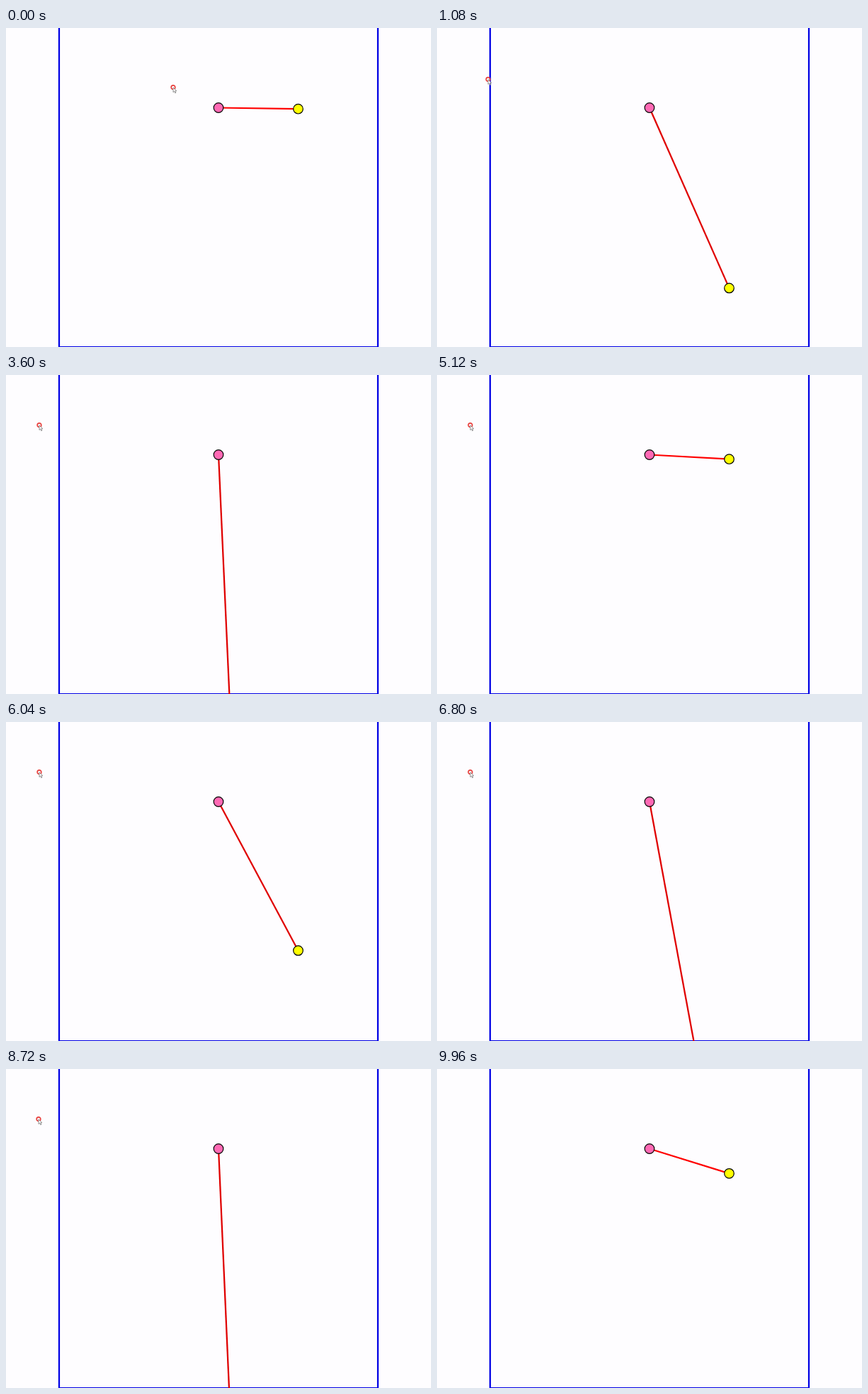
Recreate the animation shown at these times as an HTML page with a canvas. Size 600 by 450 pixels, loop 10000 ms.

```html
<!DOCTYPE html>
<html lang="en">
<head>
<meta charset="utf-8">
<title>Falling ball on a line</title>
<style>
  html, body { margin: 0; width: 100%; height: 100%; overflow: hidden; background: #fefdff; }
  canvas { display: block; }
</style>
</head>
<body>
<canvas id="stage" width="600" height="450"></canvas>
<script>
const ctx = document.getElementById('stage').getContext('2d');
const LOOP = 10000, STEP = 40;
const ANCHOR = { x: 300, y: 112.5 };
const BALL_X = 412.5, HALF_G = 180;

// Each drop: start time in seconds and release height.
const drops = [
  { start: -0.11, y: 112 },
  { start: 4.965, y: 114.4 },
  { start: 9.52, y: 112.5 }
];

// Pointer stops: time in seconds, x, y.
const stops = [
  [0, 236, 84], [1.4, 47, 71], [6.8, 47, 71], [7.2, 46, 71],
  [8.8, 46, 71], [9.36, 43, 70], [9.8, -12, 62], [10, -12, 62]
];

const smooth = u => u * u * (3 - 2 * u);

function ballY(t) {
  const drop = drops.filter(d => d.start <= t).pop();
  return drop.y + HALF_G * (t - drop.start) ** 2;
}

function pointerAt(t) {
  const i = stops.findIndex(s => s[0] > t);
  const [t0, x0, y0] = stops[i - 1], [t1, x1, y1] = stops[i];
  const k = smooth((t - t0) / (t1 - t0));
  return [x0 + (x1 - x0) * k, y0 + (y1 - y0) * k];
}

function stroke(color, width) {
  ctx.strokeStyle = color;
  ctx.lineWidth = width;
  ctx.stroke();
}

function disc(x, y, fill) {
  ctx.beginPath();
  ctx.arc(x, y, 6.8, 0, Math.PI * 2);
  ctx.fillStyle = fill;
  ctx.fill();
  stroke('#000', 1.2);
}

function pointer(x, y) {
  ctx.save();
  ctx.translate(x, y);
  ctx.beginPath();
  ctx.arc(0, -0.3, 2.8, 0, Math.PI * 2);
  stroke('#e8413f', 1.7);
  ctx.beginPath();
  for (const p of [[0, 0], [0, 6.6], [1.6, 5.2], [2.8, 7.8], [3.9, 7.2], [2.8, 4.8], [4.8, 4.7]]) ctx.lineTo(...p);
  ctx.closePath();
  ctx.fillStyle = '#fff';
  ctx.fill();
  stroke('#666', 0.7);
  ctx.restore();
}

function draw(t) {
  ctx.fillStyle = '#fefdff';
  ctx.fillRect(0, 0, 600, 450);

  ctx.beginPath();
  ctx.rect(75, -20, 450, 470);
  stroke('#0000e4', 2.25);

  const y = ballY(t);
  const shade = 255 - Math.min(31, Math.max(0, y - 150) * 0.25);
  ctx.beginPath();
  ctx.moveTo(ANCHOR.x, ANCHOR.y);
  ctx.lineTo(BALL_X, y);
  stroke(`rgb(${Math.round(shade)}, 0, 0)`, 2.25);

  disc(ANCHOR.x, ANCHOR.y, '#ff69b4');
  disc(BALL_X, y, '#ff0');
  pointer(...pointerAt(t));
}

function tick() {
  const ms = performance.now() % LOOP;
  draw(Math.floor(ms / STEP) * STEP / 1000);
  requestAnimationFrame(tick);
}
tick();
</script>
</body>
</html>
```
